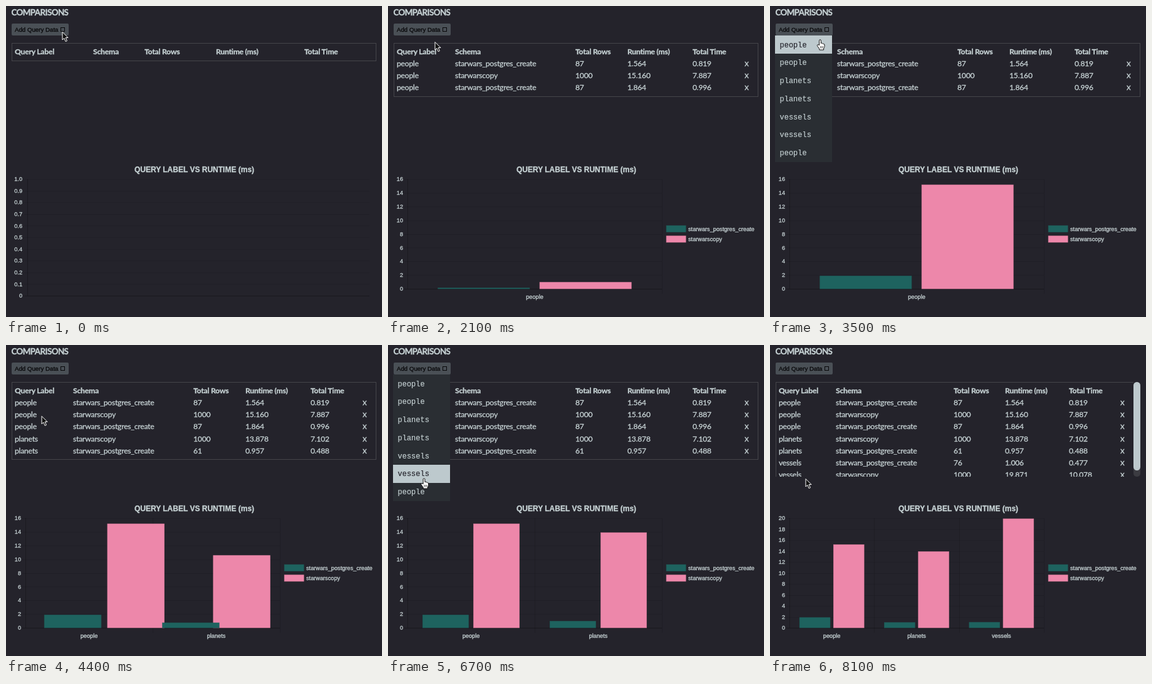
An HTML page that plays this animation: 600 px wide and 496 px high, repeating every 8200 ms.

```html
<!DOCTYPE html>
<html lang="en">
<head>
<meta charset="utf-8">
<title>Query comparisons</title>
<style>
  html, body { margin: 0; width: 100%; height: 100%; overflow: hidden; background: #24232b; }
  svg { display: block; width: 600px; height: 496px; }
  text { fill: #c6d2d4; stroke: #c6d2d4; stroke-width: .3px; white-space: pre; }
  .ui { font: 12.2px Lato, sans-serif; letter-spacing: -.25px; }
  .cross { font: 13.5px Lato, sans-serif; }
  .head { font: bold 12.2px Lato, sans-serif; letter-spacing: -.25px; }
  .big { font: bold 13.4px Lato, sans-serif; letter-spacing: -.6px; }
  .btn { font: 9.7px "Liberation Sans", Arial, sans-serif; fill: #08080a; stroke: #08080a; }
  .item { font: 12px "Liberation Mono", monospace; stroke-width: .15px; }
  .item.on { fill: #24232b; stroke: #24232b; }
  .tick { font: 9.2px "Liberation Sans", Arial, sans-serif; }
  .title { font: bold 12px "Liberation Sans", Arial, sans-serif; }
  .end { text-anchor: end; }
  .mid { text-anchor: middle; }
</style>
</head>
<body>
<svg id="stage" viewBox="0 0 600 496">
  <defs><clipPath id="view"><rect x="9" y="59" width="571" height="151"/></clipPath></defs>
  <rect width="600" height="496" fill="#24232b"/>
</svg>
<script>
const LOOP = 8200, STEP = 100;
const TEAL = '#1e635f', PINK = '#ed87aa', PALE = '#bdc9cd';
const LEFT = 31, WIDTH = 406, BASE = 451, TOP = 276;

const HEADS = ['Query Label', 'Schema', 'Total Rows', 'Runtime (ms)', 'Total Time'];
const A = 'starwars_postgres_create', B = 'starwarscopy';
const ROWS = [
  ['people', A, '87', '1.564', '0.819'],
  ['people', B, '1000', '15.160', '7.887'],
  ['people', A, '87', '1.864', '0.996'],
  ['planets', B, '1000', '13.878', '7.102'],
  ['planets', A, '61', '0.957', '0.488'],
  ['vessels', A, '76', '1.006', '0.477'],
  ['vessels', B, '1000', '19.871', '10.078']
];
const CATS = [['people', 1.864, 15.16], ['planets', .957, 13.878], ['vessels', 1.006, 19.871]];
const ITEMS = ['people', 'people', 'planets', 'planets', 'vessels', 'vessels', 'people'];

const WIDE = [14, 107, 299, 382, 486, 569];
const SCENES = [
  { from: 0, rows: 0, cols: [14, 139, 221, 335, 476], bottom: 88 },
  { from: 2100, start: 2084, rows: 3, cols: WIDE, bottom: 145, max: 16 },
  { from: 4200, start: 4100, rows: 5, cols: WIDE, bottom: 183, max: 16 },
  { from: 7100, start: 7085, rows: 7, cols: [14, 105, 293, 375, 477, 559], bottom: 222, max: 20 }
];
const OPEN = [[900, 2100], [3300, 4200], [5700, 7100]];

// time, x, y of the pointer tip
const PATH = [
  [0, 90, 41], [100, 89, 41], [500, 89, 41], [600, 86, 40], [1000, 80, 39],
  [1200, 80, 39], [1700, 79, 55], [1900, 79, 55], [2000, 77, 57], [2100, 75, 57],
  [2800, 75, 57], [3100, 77, 38], [3300, 78, 38], [3500, 80, 54], [4100, 57, 113],
  [4600, 57, 113], [5000, 58, 13], [5100, 58, 13], [5400, 60, 36], [5700, 60, 37],
  [6300, 57, 211], [6600, 57, 211], [6700, 57.5, 213], [6800, 57.5, 213], [6900, 57, 213], [LOOP, 57, 213]
];

const stage = document.getElementById('stage');

function add(parent, tag, attrs, content) {
  const el = document.createElementNS('http://www.w3.org/2000/svg', tag);
  for (const k in attrs) el.setAttribute(k, attrs[k]);
  if (content !== undefined) el.textContent = content;
  parent.append(el);
  return el;
}
const group = (parent = stage, attrs = {}) => add(parent, 'g', attrs);
const text = (parent, x, y, str, cls) => add(parent, 'text', { x, y, class: cls }, str);
const rect = (parent, x, y, width, height, fill, more) =>
  add(parent, 'rect', { x, y, width, height, fill, ...more });
const line = (parent, d, alpha) =>
  add(parent, 'path', { d, fill: 'none', stroke: '#000', 'stroke-opacity': alpha });
const edge = color => ({ stroke: color, 'stroke-width': .8, 'stroke-opacity': .7 });
const show = (el, on) => el.setAttribute('display', on ? 'inline' : 'none');

function buildTable(scene, g) {
  const scroll = scene.rows > 6;
  const body = group(g, scroll ? { 'clip-path': 'url(#view)' } : {});
  rect(body, 9.5, 59.5, scroll ? 571 : 581, scene.bottom - 60, 'none', { stroke: '#45454a' });
  HEADS.forEach((h, i) => text(body, scene.cols[i], 77, h, 'head'));
  ROWS.slice(0, scene.rows).forEach((row, r) => {
    const y = 96.2 + r * 19.1;
    row.forEach((s, i) => text(body, scene.cols[i], y, s, 'ui'));
    text(body, scene.cols[5], y, 'x', 'cross');
  });
  if (scroll) {
    rect(g, 580, 59, 11, 151, '#3b3b41', { rx: 5 });
    rect(g, 580, 59, 11, 141, PALE, { rx: 5.5 });
  }
}

function buildAxes(scene, n, g) {
  const left = n ? LEFT : 34, right = n ? LEFT + WIDTH : 580;
  const base = n ? BASE : 462, count = n ? scene.max / 2 : 10;
  for (let i = 0; i <= count; i++) {
    const y = base - (base - TOP) * i / count;
    const label = n ? i * 2 : i ? (i / 10).toFixed(1) : '0';
    text(g, n ? 24 : 26, y + 3.2, label, 'tick end');
    line(g, `M${left - 5} ${Math.round(y) + .5}H${right}`, i ? .1 : .3);
  }
  line(g, `M${left + .5} ${TOP}V${base}`, .25);
  for (let i = 1; i <= n; i++)
    line(g, `M${Math.round(left + WIDTH * i / n) + .5} ${TOP}V${base + 8}`, .12);
  for (let i = 0; i < n; i++)
    text(g, LEFT + WIDTH * (i + .5) / n, 467, CATS[i][0], 'tick mid');
  if (!n) return;
  [[350.2, TEAL, A], [366.7, PINK, B]].forEach(([y, fill, name]) => {
    rect(g, 444.2, y, 31, 10.2, fill, edge(fill));
    text(g, 479, y + 8.5, name, 'tick');
  });
}

// settled centre, width and height of one bar when n categories are shown
function place(n, cat, set) {
  const w = WIDTH / n;
  return [LEFT + w * (cat + .3 + .4 * set), w * .36,
          CATS[cat][set + 1] / SCENES[n].max * (BASE - TOP)];
}

text(stage, 8.5, 15.2, 'COMPARISONS', 'big');
const button = rect(stage, 9, 28, 91, 19, '#4a5056', { rx: 2 });
text(stage, 14, 41, 'Add Query Data', 'btn');
rect(stage, 87.5, 34.5, 6, 6, 'none', { stroke: '#08080a' });
text(stage, 300.5, 265.4, 'QUERY LABEL VS RUNTIME (ms)', 'title mid');

const layers = SCENES.map((scene, n) => {
  const g = group();
  buildTable(scene, g);
  buildAxes(scene, n, g);
  return g;
});

const bars = [];
const plot = group();
for (const set of [1, 0]) {
  const fill = set ? PINK : TEAL;
  CATS.forEach((c, cat) => bars.push({ set, cat, el: rect(plot, 0, 0, 0, 0, fill, edge(fill)) }));
}

const menu = group();
rect(menu, 8, 47, 91, 202, '#2a2e33');
const mark = rect(menu, 8, 47, 91, 29, PALE);
const items = ITEMS.map((s, i) => text(menu, 15.5, 65.5 + i * 28.75, s, 'item'));

const arrow = add(stage, 'path', {
  d: 'M0 .5V13L2.9 10.3L5.1 15.6L7.4 14.6L5.2 9.5H9Z',
  fill: '#111', stroke: '#fff', 'stroke-width': 1
});
const hand = group();
add(hand, 'path', {
  d: 'M-1.4 8.6V1.2A1.4 1.4 0 0 1 1.4 1.2V5.5Q2.8 4.4 3.6 6Q5 5.2 5.6 6.7Q7 6.3 7 8V10.5Q6.8 12.5 5.6 14V16H-1.2V14.4L-4.6 9.5Q-5 7.6-3.2 7.6Z',
  fill: '#fff', stroke: '#111', 'stroke-linejoin': 'round'
});
add(hand, 'path', { d: 'M.4 10V13.5M2.4 10V13.5M4.4 10V13.5', stroke: '#111', 'stroke-width': .7 });

function pointer(t) {
  const i = PATH.findIndex(k => k[0] > t);
  const [t0, x0, y0] = PATH[i - 1], [t1, x1, y1] = PATH[i];
  const k = (t - t0) / (t1 - t0);
  return [x0 + (x1 - x0) * k, y0 + (y1 - y0) * k];
}

function drawBars(n, t) {
  const p = n ? 1 - (1 - Math.min(1, (t - SCENES[n].start) / 1000)) ** 4 : 0;
  for (const { set, cat, el } of bars) {
    show(el, cat < n);
    if (cat >= n) continue;
    const to = place(n, cat, set);
    const from = cat < n - 1 ? place(n - 1, cat, set)
      : [to[0], n > 1 ? place(n - 1, 0, set)[1] : to[1], 0];
    const [c, w, h] = to.map((v, i) => from[i] + (v - from[i]) * p);
    el.setAttribute('x', c - w / 2);
    el.setAttribute('width', w);
    el.setAttribute('y', BASE - h);
    el.setAttribute('height', h);
  }
}

function draw(now) {
  const t = Math.floor(now % LOOP / STEP) * STEP;
  const n = SCENES.filter(s => s.from <= t).length - 1;
  layers.forEach((g, i) => show(g, i === n));
  drawBars(n, t);

  const [x, y] = pointer(t);
  const open = OPEN.some(([a, b]) => t >= a && t < b);
  const overButton = t >= 600 && x > 9 && x < 100 && y >= 28 && y < 47;
  const over = open && y >= 47 ? Math.floor((y - 47) / 28.8) : -1;
  button.setAttribute('fill', overButton ? PALE : '#4a5056');
  show(menu, open);
  show(mark, over >= 0);
  mark.setAttribute('y', 47 + over * 28.8);
  items.forEach((el, i) => el.setAttribute('class', i === over ? 'item on' : 'item'));

  const link = overButton || over >= 0;
  show(arrow, !link);
  show(hand, link);
  (link ? hand : arrow).setAttribute('transform', `translate(${x} ${y})`);
}

const begin = performance.now();
function tick() {
  draw(performance.now() - begin);
  requestAnimationFrame(tick);
}
tick();
</script>
</body>
</html>
```
